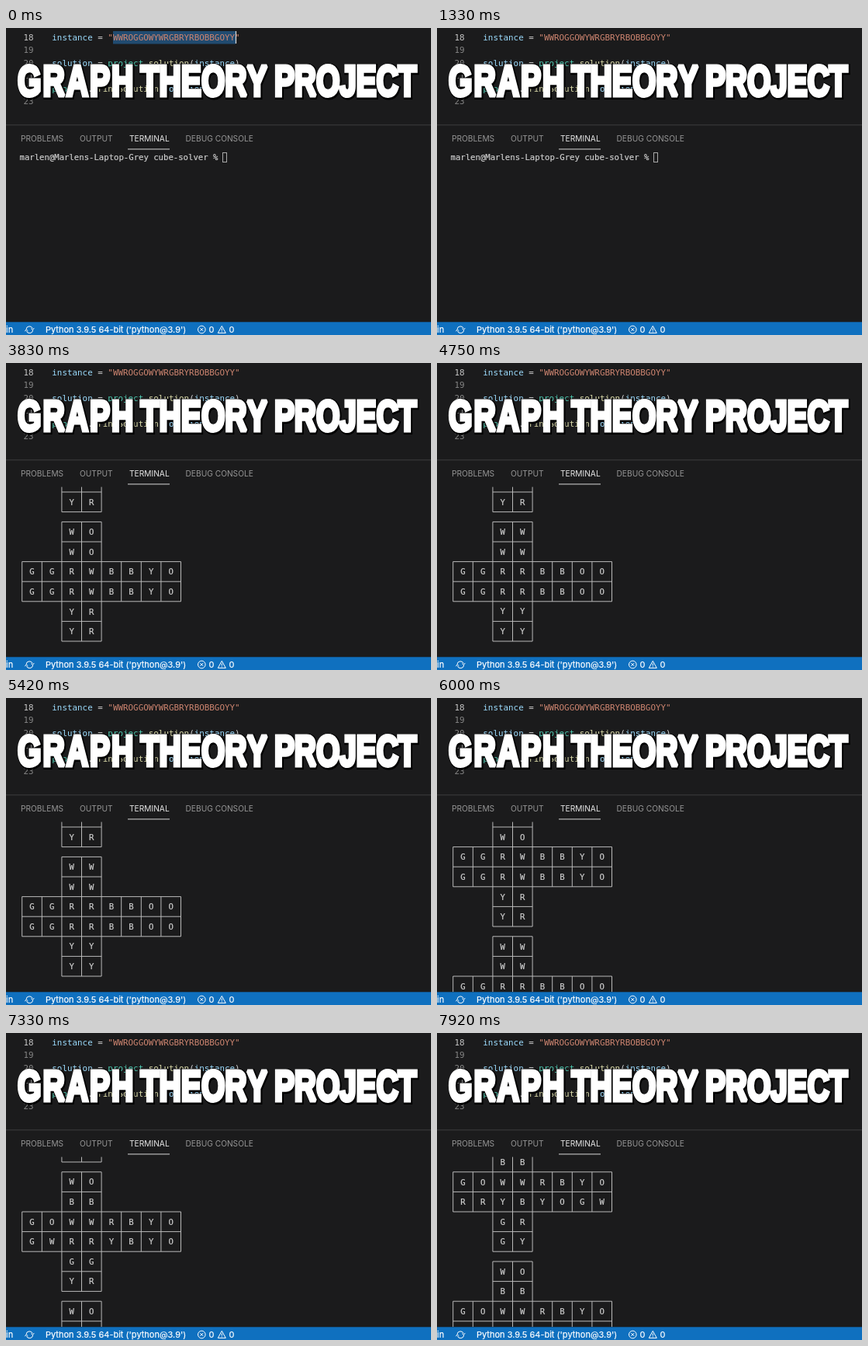
Recreate the animation shown at these times as an HTML page. Size 548 by 395 pixels, loop 8 s.

```html
<!DOCTYPE html>
<html lang="en">
<head>
<meta charset="utf-8">
<title>Cube solver</title>
<style>
  html, body { margin: 0; width: 100%; height: 100%; overflow: hidden; background: #1b1b1c; }
  svg { display: block; width: 548px; height: 395px; }
  text { white-space: pre; }
  .code, .term { font-family: "DejaVu Sans Mono", "Liberation Mono", monospace; }
  .code { font-size: 10.88px; fill: #d4d4d4; }
  .term { font-size: 10.63px; fill: #cccccc; }
  .term text { stroke: #cccccc; stroke-width: .2; }
  .num { fill: #858585; }
  .now { fill: #c6c6c6; }
  .var { fill: #9cdcfe; }
  .mod { fill: #4ec9b0; }
  .fn { fill: #dcdcaa; }
  .str { fill: #ce8570; }
  .ui { font-family: Inter, Roboto, sans-serif; }
  .tabs { font-size: 10.2px; fill: #969696; }
  .tabs .on { fill: #e7e7e7; }
  .bar { font-size: 11px; fill: #fff; stroke: #fff; stroke-width: .2; }
  .icon { fill: none; stroke: #fff; stroke-width: 1; }
  .grid { fill: none; stroke: #b9b9b9; stroke-width: 1; }
  .title { font: bold 56px "Liberation Sans", Arial, sans-serif; font-kerning: none; stroke-miterlimit: 2; }
  .edge { fill: #000; stroke: #000; stroke-width: 8; }
  .face { fill: #fff; stroke: #fff; stroke-width: 5; }
</style>
</head>
<body>
<svg viewBox="0 0 548 395" xmlns="http://www.w3.org/2000/svg">
  <defs>
    <clipPath id="pane"><rect y="159.5" width="548" height="218.5"/></clipPath>
    <g id="words">
      <text transform="translate(15 86.8) scale(.7 1)" letter-spacing="2.8">GRAPH</text>
      <text transform="translate(173.5 86.8) scale(.7 1)">THEORY</text>
      <text transform="translate(346 86.8) scale(.7 1)" letter-spacing="-.4">PROJECT</text>
    </g>
  </defs>
  <rect width="548" height="395" fill="#1b1b1c"/>

  <g id="selection">
    <rect x="138" y="4" width="158" height="16.5" fill="#214b70"/>
    <path d="M296.5 4v16" stroke="#ddd" stroke-width="1.2"/>
  </g>
  <g class="code" id="editor">
    <text x="59.3" y="16"><tspan class="var">instance</tspan> = <tspan class="str">"WWROGGOWYWRGBRYRBOBBGOYY"</tspan></text>
    <text x="59.3" y="48.8"><tspan class="var">solution</tspan> = <tspan class="mod">project</tspan>.<tspan class="fn">solution</tspan>(<tspan class="var">instance</tspan>)</text>
    <text x="59.3" y="81.6"><tspan class="mod">project</tspan>.<tspan class="fn">printSolution</tspan>(<tspan class="var">solution</tspan>)</text>
  </g>

  <g class="title">
    <use href="#words" class="edge" x="1" y="1"/>
    <use href="#words" class="face"/>
  </g>

  <path d="M0 124.8h548" stroke="#3e3e3e"/>
  <g class="ui tabs">
    <text x="19" y="145.6">PROBLEMS</text>
    <text x="95" y="145.6">OUTPUT</text>
    <text x="159" y="145.6" class="on">TERMINAL</text>
    <text x="231.5" y="145.6">DEBUG CONSOLE</text>
  </g>
  <path d="M157 155.9h54" stroke="#d8d8d8"/>

  <g clip-path="url(#pane)">
    <g id="screen" class="term">
      <g id="prompt">
        <text x="17.5" y="170">marlen@Marlens-Laptop-Grey cube-solver %</text>
        <rect x="279.5" y="160.5" width="5" height="12" fill="none" stroke="#a8a8a8"/>
      </g>
      <text id="command" x="17.5" y="170">/opt/homebrew/opt/python@3.9/bin/python3.9 /Users/marlen/Documents/cs/Repos/cube-solver/main.py</text>
    </g>
  </g>

  <rect y="378.3" width="548" height="16.7" fill="#0f70bf"/>
  <g class="ui bar">
    <text x="0" y="392">in</text>
    <text x="51" y="392">Python 3.9.5 64-bit ('python@3.9')</text>
    <text x="261.5" y="392">0</text>
    <text x="287.5" y="392">0</text>
  </g>
  <g class="icon">
    <path d="M26 387.5a4.3 4.3 0 0 1 8.3-.8M34.7 389a4.3 4.3 0 0 1-8.3.8M32.3 386.7l2.2 1.8 1.7-2.3M28.3 389.7l-2.1-1.8-1.8 2.3"/>
    <circle cx="252.3" cy="388" r="4.8"/>
    <path d="M250.4 386.1l3.8 3.8m0-3.8l-3.8 3.8"/>
    <path d="M278.3 383.4l5 9h-10zM278.3 386.5v3M278.3 390.3v1"/>
  </g>
</svg>
<script>
  const LOOP = 8000, ROW = 12.8, COL = 6.4, LEFT = 20.7, TOP = 166;
  const CUBE_ROWS = 13, PANE_ROWS = 17;
  const DESELECT = 1250, RUN = 2580, FIRST_PRINT = 2750, PRINT_GAP = 250;

  // Each net is read row by row: up, the four sides, down.
  const nets = [
    "WW RO GGYWBRBO OWRGYRBB GO YY",
    "WW WG GGRYRRBO OOGWORBB YB YY",
    "WO BB GOWWRBYO RRYBYOGW GR GY",
    "WO BB GOWWRBYO GWRRYBYO GG YR",
    "WO WO GGRWBBYO GGRWBBYO YR YR",
    "WW WW GGRRBBOO GGRRBBOO YY YY"
  ];
  // Scrolling back: time and first visible row.
  const scroll = [[5420, 63], [6000, 55], [7330, 39], [7420, 39], [7920, 30]];

  const byId = id => document.getElementById(id);
  const screen = byId("screen");

  function add(parent, tag, attrs, content = "") {
    const node = document.createElementNS("http://www.w3.org/2000/svg", tag);
    for (const key in attrs) node.setAttribute(key, attrs[key]);
    node.textContent = content;
    return parent.appendChild(node);
  }

  for (let i = 0; i < 6; i++) {
    add(byId("editor"), "text", { x: 22.5, y: 16 + 16.4 * i, class: i ? "num" : "now" }, String(18 + i));
  }

  const colX = col => LEFT + col * COL;
  const rowY = row => TOP + row * ROW;

  function drawCube(net, index) {
    const cube = add(screen, "g", {});
    const top = 1 + index * CUBE_ROWS;
    let lines = "";
    for (let i = 0; i <= 6; i++) {
      const wide = i >= 2 && i <= 4;
      lines += `M${colX(wide ? 0 : 8)} ${rowY(top + 2 * i)}H${colX(wide ? 32 : 16)}`;
    }
    for (let i = 0; i <= 8; i++) {
      const tall = i >= 2 && i <= 4;
      lines += `M${colX(4 * i)} ${rowY(top + (tall ? 0 : 4))}V${rowY(top + (tall ? 12 : 8))}`;
    }
    add(cube, "path", { d: lines, class: "grid" });
    net.split(" ").forEach((stickers, r) => {
      const indent = stickers.length === 2 ? 2 : 0;
      [...stickers].forEach((color, c) => add(cube, "text", {
        x: colX(4 * (c + indent) + 2) - COL / 2,
        y: rowY(top + 2 * r + 1) + 3.9
      }, color));
    });
    return cube;
  }
  const cubes = nets.map(drawCube);

  function firstRow(t, printed) {
    if (t < scroll[0][0]) return Math.max(0, printed * CUBE_ROWS + 2 - PANE_ROWS);
    for (let i = 1; i < scroll.length; i++) {
      const [t0, a] = scroll[i - 1], [t1, b] = scroll[i];
      if (t < t1) return Math.round(a + (b - a) * (t - t0) / (t1 - t0));
    }
    return scroll[scroll.length - 1][1];
  }

  const show = (node, on) => { node.style.display = on ? "" : "none"; };

  function render() {
    const t = performance.now() % LOOP;
    const printed = Math.min(cubes.length, Math.max(0, Math.floor((t - FIRST_PRINT) / PRINT_GAP) + 1));
    show(byId("selection"), t < DESELECT);
    show(byId("prompt"), t < RUN);
    show(byId("command"), t >= RUN);
    cubes.forEach((cube, i) => show(cube, i < printed));
    screen.setAttribute("transform", `translate(0 ${-ROW * firstRow(t, printed)})`);
    requestAnimationFrame(render);
  }
  render();
</script>
</body>
</html>
```
